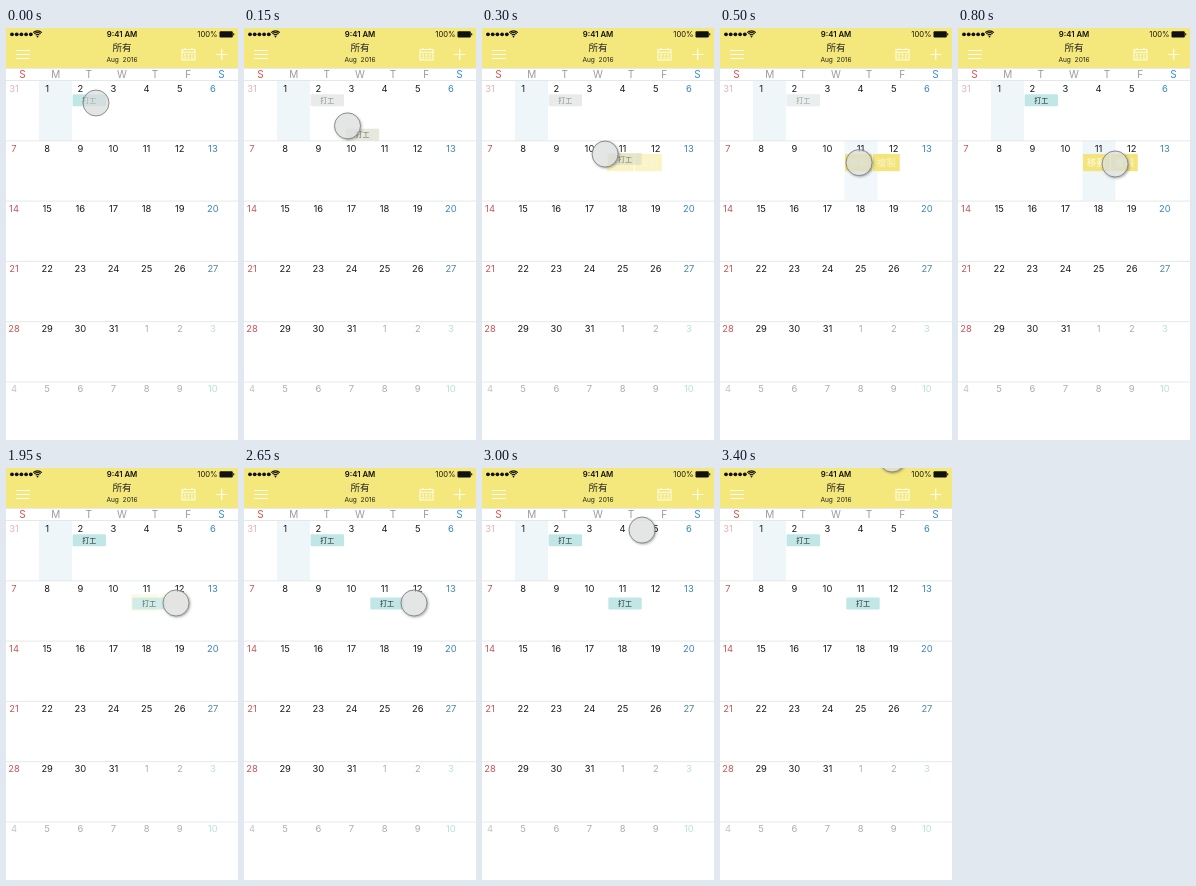
Write an HTML page with a canvas that moves like this. It is 232 by 412 pixels and loops after 3.6 s.

```html
<!DOCTYPE html>
<html lang="zh-Hant">
<head>
<meta charset="utf-8">
<title>Calendar drag and copy</title>
<style>
html, body { margin: 0; width: 100%; height: 100%; overflow: hidden; background: #fff; }
canvas { display: block; width: 232px; height: 412px; }
</style>
</head>
<body>
<canvas id="stage"></canvas>
<script>
const W = 232, H = 412, LOOP = 3600;
const canvas = document.getElementById('stage');
const ctx = canvas.getContext('2d');
const scale = window.devicePixelRatio || 1;
canvas.width = W * scale;
canvas.height = H * scale;

const LATIN = 'Inter, "Liberation Sans", sans-serif';
const CJK = '"Noto Sans CJK TC", "Noto Sans CJK SC", "Noto Sans CJK", sans-serif';
const COL = 33.15, ROW = 60.3, TOP = 52.5;

const clamp = v => Math.max(0, Math.min(1, v));
const mix = (a, b, k) => a + (b - a) * k;
const ramp = (t, from, to) => {
  const k = clamp((t - from) / (to - from));
  return k * k * (3 - 2 * k);
};
const quartInOut = k => k < 0.5 ? 8 * k ** 4 : 1 - 8 * (1 - k) ** 4;

function rect(x, y, w, h, fill) {
  ctx.fillStyle = fill;
  ctx.fillRect(x, y, w, h);
}

function roundRect(x, y, w, h, r, fill) {
  ctx.beginPath();
  ctx.roundRect(x, y, w, h, r);
  ctx.fillStyle = fill;
  ctx.fill();
}

function text(str, x, y, size, fill, { font = LATIN, weight = 400, align = 'center' } = {}) {
  ctx.font = `${weight} ${size}px ${font}`;
  ctx.textAlign = align;
  ctx.fillStyle = fill;
  ctx.fillText(str, x, y);
}

function withAlpha(alpha, draw) {
  if (alpha <= 0) return;
  ctx.save();
  ctx.globalAlpha *= alpha;
  draw();
  ctx.restore();
}

function lines(width, color, ...segments) {
  ctx.beginPath();
  for (const [x1, y1, x2, y2] of segments) {
    ctx.moveTo(x1, y1);
    ctx.lineTo(x2, y2);
  }
  ctx.lineWidth = width;
  ctx.strokeStyle = color;
  ctx.stroke();
}

function drawStatusBar() {
  ctx.fillStyle = '#111';
  for (let i = 0; i < 5; i++) {
    ctx.beginPath();
    ctx.arc(6 + i * 4.7, 6.3, 1.9, 0, Math.PI * 2);
    ctx.fill();
  }
  ctx.strokeStyle = '#111';
  ctx.lineWidth = 1.2;
  for (const r of [2.6, 4.4, 6.1]) {
    ctx.beginPath();
    ctx.arc(31.5, 9, r, -Math.PI * 0.75, -Math.PI * 0.25);
    ctx.stroke();
  }
  ctx.beginPath();
  ctx.arc(31.5, 8.6, 0.9, 0, Math.PI * 2);
  ctx.fill();
  text('9:41 AM', 116, 9.2, 7.8, '#111', { weight: 600 });
  text('100%', 211.5, 9.2, 7.6, '#111', { align: 'right' });
  roundRect(213.5, 3.2, 13.3, 6.2, 1.2, '#111');
  rect(227.2, 5.2, 1, 2.2, '#111');
}

function drawHeader() {
  rect(0, 0, W, 40, '#f4e87c');
  drawStatusBar();
  lines(1.1, '#fffef0', [10, 22.5, 24, 22.5], [10, 26.5, 24, 26.5], [10, 30.5, 24, 30.5]);
  text('所有', 116, 22.8, 9.6, '#222', { font: CJK, weight: 500 });
  text('Aug  2016', 116, 33.6, 6.6, '#222');

  ctx.strokeStyle = '#fffef0';
  ctx.lineWidth = 1;
  ctx.strokeRect(176, 21.5, 13, 10.5);
  lines(1, '#fffef0', [176, 24.3, 189, 24.3], [179, 20, 179, 22], [186, 20, 186, 22]);
  for (let i = 0; i < 6; i++) {
    rect(178.2 + (i % 3) * 3.4, 26 + Math.floor(i / 3) * 2.8, 1.8, 1.5, '#fffef0');
  }
  lines(1.1, '#fffef0', [210, 26.5, 221.5, 26.5], [215.7, 20.8, 215.7, 32.2]);
}

function dayColor(col, inMonth) {
  if (col === 0) return '#cb5558';
  if (col === 6) return inMonth ? '#3887bd' : '#b9e0e0';
  return inMonth ? '#1c1c1c' : '#adadad';
}

function drawGrid(dropTarget) {
  rect(33, 53, 33, 59.5, '#eff6fa');
  withAlpha(dropTarget, () => rect(124.5, 113, 33, 59.5, '#eff6fa'));

  [...'SMTWTFS'].forEach((letter, i) => {
    const color = i === 0 ? '#d75550' : i === 6 ? '#3d8fc6' : '#9a9a9a';
    text(letter, 16.5 + i * 33.15, 50.3, 10, color);
  });
  lines(0.8, '#dedeD8', [0, 40.3, W, 40.3]);
  for (let row = 0; row < 6; row++) {
    const y = TOP + row * ROW;
    lines(0.8, '#dfe3e5', [0, y, W, y]);
    for (let col = 0; col < 7; col++) {
      const n = row * 7 + col;
      const inMonth = n > 0 && n <= 31;
      const label = n === 0 ? 31 : n > 31 ? n - 31 : n;
      let color = dayColor(col, inMonth);
      if (n === 0) color = '#e5b4b5';
      if (n === 35) color = '#c2c2c2';
      if (n === 27) color = '#4e8a98';
      text(label, 8 + col * COL, 63.5 + row * 60.15, 9.4, color);
    }
  }
}

function drawEvent(cx, cy, fill = '#c0e7e6', ink = '#222') {
  roundRect(cx - 16.7, cy - 6, 33.4, 12, 1.2, fill);
  text('打工', cx, cy + 2.5, 7, ink, { font: CJK });
}

function drawButton(x, label, ink) {
  rect(x, 126, 26.8, 17.2, '#f3e57c');
  withAlpha(ink, () => text(label, x + 13.4, 138.1, 9.6, '#fff', { font: CJK }));
}

function drawMenu(t) {
  const fade = mix(0, 1, ramp(t, 200, 420)) * (1 - ramp(t, 1690, 2050));
  const ink = mix(0.6, 1, ramp(t, 500, 1100));
  const pressed = ramp(t, 1150, 1400);
  withAlpha(fade, () => {
    drawButton(125, '移動', ink);
    withAlpha(mix(1, 0.65, pressed), () => drawButton(153, '複製', ink));
  });
}

// Finger waypoints: time, x, y
const PATH = [[0, 90, 75], [300, 123, 126], [800, 157, 136], [1400, 170, 135]];

function slope(i, axis) {
  if (i === 0 || i === PATH.length - 1) return 0;
  const a = PATH[i - 1], b = PATH[i + 1];
  return (b[axis] - a[axis]) / (b[0] - a[0]);
}

function follow(t, axis) {
  const i = PATH.findIndex((p, n) => n < PATH.length - 1 && t < PATH[n + 1][0]);
  const a = PATH[i], b = PATH[i + 1], span = b[0] - a[0];
  const k = (t - a[0]) / span, k2 = k * k, k3 = k2 * k;
  return (2 * k3 - 3 * k2 + 1) * a[axis] + (k3 - 2 * k2 + k) * span * slope(i, axis)
    + (3 * k2 - 2 * k3) * b[axis] + (k3 - k2) * span * slope(i + 1, axis);
}

function fingerAt(t) {
  if (t < 1400) return [follow(t, 1), follow(t, 2)];
  const k = quartInOut(clamp((t - 2690) / 620));
  return [mix(170, 172, k) - 44 * k * (1 - k), mix(135, -9, k)];
}

function drawFinger(t) {
  const [x, y] = fingerAt(t);
  const lift = ramp(t, 0, 200);
  ctx.save();
  ctx.beginPath();
  ctx.rect(-50, -50, W + 100, H + 100);
  ctx.arc(x, y, 13, 0, Math.PI * 2, true);
  ctx.clip('evenodd');
  ctx.shadowColor = `rgba(0, 0, 0, ${0.4 * lift})`;
  ctx.shadowBlur = 3 * scale;
  ctx.shadowOffsetX = ctx.shadowOffsetY = scale;
  ctx.beginPath();
  ctx.arc(x, y, 13, 0, Math.PI * 2);
  ctx.fillStyle = '#ddd';
  ctx.fill();
  ctx.restore();

  ctx.beginPath();
  ctx.arc(x, y, 13, 0, Math.PI * 2);
  ctx.fillStyle = 'rgba(218, 220, 220, 0.72)';
  ctx.fill();
  ctx.lineWidth = 1;
  ctx.strokeStyle = 'rgba(125, 125, 125, 0.85)';
  ctx.stroke();
}

function draw(t) {
  ctx.setTransform(scale, 0, 0, scale, 0, 0);
  rect(0, 0, W, H, '#fff');
  drawHeader();
  drawGrid(ramp(t, 350, 550) * (1 - ramp(t, 1690, 2000)));

  const dimmed = ramp(t, 0, 120) * (1 - ramp(t, 450, 600));
  withAlpha(1 - dimmed, () => drawEvent(83.3, 72.3));
  withAlpha(dimmed, () => drawEvent(83.3, 72.3, '#e9ebeb', '#888'));

  drawMenu(t);
  const drag = ramp(t, 0, 270);
  const ghost = ramp(t, 0, 80) * (1 - ramp(t, 280, 460));
  withAlpha(ghost * 0.65, () =>
    drawEvent(mix(83.3, 143, drag), mix(72.3, 131, drag), '#d9dcc8', '#333'));
  withAlpha(ramp(t, 1720, 2080), () => drawEvent(143, 135.5));
  drawFinger(t);
}

const start = performance.now();
function tick() {
  draw((performance.now() - start) % LOOP);
  requestAnimationFrame(tick);
}
tick();
</script>
</body>
</html>
```
